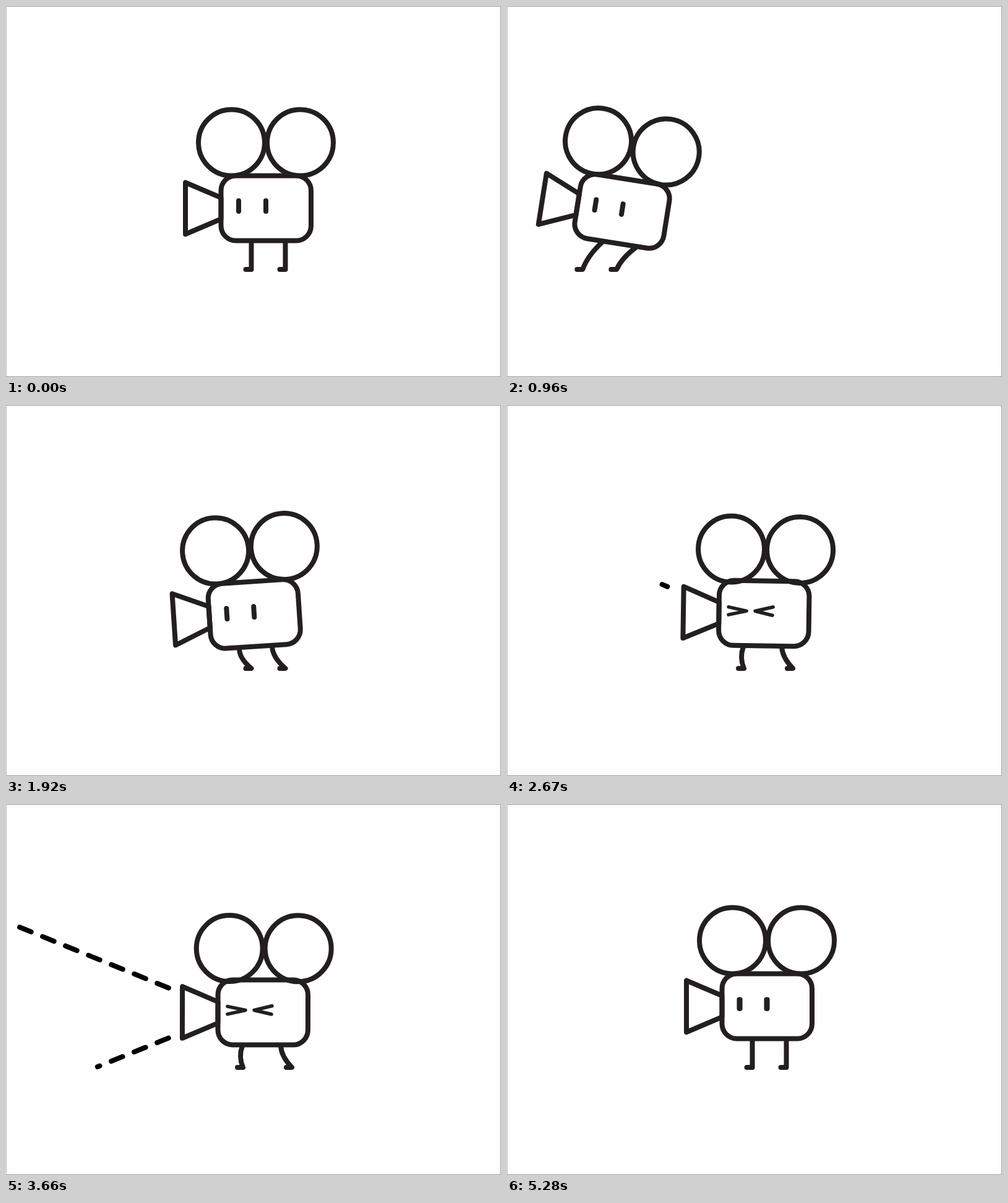
Animation, 800 px wide and 600 px high, one loop 5.31 s. Source, as an HTML page:

```html
<!DOCTYPE html>
<html lang="en">
<head>
<meta charset="utf-8">
<title>Movie camera</title>
<style>
  html, body { margin: 0; width: 100%; height: 100%; overflow: hidden; background: #fefefe; }
  svg { display: block; width: 800px; height: 600px; }
</style>
</head>
<body>
<svg viewBox="0 0 800 600" fill="none" stroke="#231f20" stroke-width="8" stroke-linecap="round" stroke-linejoin="round">
  <rect width="800" height="600" fill="#fefefe" stroke="none"/>
  <g id="root">
    <path id="legL"/>
    <path id="legR"/>
    <g id="body">
      <g stroke="#000">
        <path id="beamTop" stroke-dasharray="20 20"/>
        <path id="beamBottom" stroke-dasharray="20 20"/>
      </g>
      <g id="reels">
        <circle cx="364.5" cy="221" r="53.5"/>
        <circle cx="475.5" cy="221" r="53.5"/>
      </g>
      <path d="M290 285.5V369L347.5 344.5V310Z"/>
      <rect x="347.5" y="274.5" width="145.5" height="105" rx="24"/>
      <g id="eyes" stroke="none" fill="#231f20">
        <rect id="eyeL" x="-4" y="-12.5" width="8" height="25" rx="4"/>
        <rect id="eyeR" x="-4" y="-12.5" width="8" height="25" rx="4"/>
      </g>
      <path id="squint" stroke-width="5.5" d="M363 317.5L392 323.5L363 330M435 316.5L406 323.5L434 330"/>
    </g>
  </g>
  <rect x=".5" y=".5" width="799" height="599" stroke="#999" stroke-width="1"/>
</svg>
<script>
const LOOP = 5310, STEP = 30;
const el = id => document.getElementById(id);
const set = (id, name, value) => el(id).setAttribute(name, value);
const clamp = p => Math.min(1, Math.max(0, p));
const span = (t, from, to) => clamp((t - from) / (to - from));
const ease = p => p * p * (3 - 2 * p);
const arc = p => Math.sin(Math.PI * p);

// body x, y, angle; foot shift L, R; leg bend L, R; hip shift L, R; reel x, y
const STAND   = [0, 0, 0, 0, 0, 0, 0, 0, 0, 0, 0];
const CROUCH  = [-6, 16, -2, 0, 0, -18, -22, 0, 0, 0, 0];
const UP      = [0, -4, 0, 0, 0, 0, 0, 0, 0, 0, 0];
const SLIDE   = [0, 10, 0, 0, 0, -15, -24, 0, 1, 0, 0];
const LAG     = [40, 5, 9, 0, 0, -8, -8, 0, 0, 0, 0];
const BRAKE   = [-19, 11, -3.8, 0, 0, -10, -10, -4, -6, 0, 0];
const REBOUND = [3, -1, 0.8, 0, 0, 0, 0, 0, 0, 0, 0];
const BRACE   = [-5, 10, 0, -13.5, 10.5, -7, -8, -9.5, -2.5, 1.5, 2.7];

const POSES = [
  [0, STAND], [110, CROUCH], [180, UP], [280, SLIDE], [410, STAND], [470, CROUCH],
  [570, UP], [615, STAND], [720, STAND], [850, LAG], [1200, LAG], [1260, SLIDE],
  [1780, SLIDE], [1920, BRAKE], [2130, REBOUND], [2370, STAND], [2410, STAND],
  [2580, BRACE], [4110, BRACE], [4290, REBOUND], [4440, STAND], [LOOP, STAND]
];

function poseAt(t) {
  const i = POSES.findIndex(([time]) => time > t);
  const [t0, a] = POSES[i - 1], [t1, b] = POSES[i];
  const p = ease(span(t, t0, t1));
  return a.map((v, k) => v + (b[k] - v) * p);
}

function rootAt(t) {
  const flip = span(t, 150, 430), hop = arc(span(t, 1560, 1790));
  let x = 28 * arc(flip);
  if (t >= 720) x = -630 * span(t, 720, 1200) ** 1.2;
  if (t > 1230) x = 540 * (1 - span(t, 1320, 1790)) ** 1.3;
  return { x, y: -172 * arc(flip) - 66 * hop, angle: 360 * ease(flip) - 20 * hop };
}

const place = (x, y, angle) => `translate(${x} ${y}) rotate(${angle} 420 327)`;

function drawLeg(id, x, pose, shift, bend, hipShift) {
  const a = pose[2] * Math.PI / 180, hx = x - 420 + hipShift, hy = 54;
  const hipX = 420 + pose[0] + hx * Math.cos(a) - hy * Math.sin(a);
  const hipY = 327 + pose[1] + hx * Math.sin(a) + hy * Math.cos(a);
  const ankle = x + shift;
  set(id, 'd', `M${hipX} ${hipY}Q${(hipX + ankle) / 2 + bend} ${(hipY + 426) / 2} ${ankle} 426H${ankle - 9}`);
}

function drawBeam(id, x0, y0, x1, y1, t) {
  const start = ease(span(t, 3840, 4140)), end = ease(span(t, 2610, 2960));
  const at = p => `${x0 + (x1 - x0) * p} ${y0 + (y1 - y0) * p}`;
  const firstDash = 6 + (t - 3270) * 0.1572;
  set(id, 'd', `M${at(start)}L${at(end)}`);
  set(id, 'stroke-dashoffset', 20 - firstDash);
  set(id, 'visibility', end > 0 && start < 1 ? 'visible' : 'hidden');
}

function drawEyes(t) {
  const blink = [600, 4860, 5130].reduce((sum, from) => sum + arc(span(t, from, from + 180)) ** 3, 0);
  const scale = `scale(${1 + 1.1 * blink} ${1 - 0.72 * blink})`;
  set('eyeL', 'transform', `translate(376 323.5) ${scale}`);
  set('eyeR', 'transform', `translate(420 323.5) ${scale}`);
  const squinting = t >= 2550 && t < 4140;
  set('eyes', 'visibility', squinting ? 'hidden' : 'visible');
  set('squint', 'visibility', squinting ? 'visible' : 'hidden');
}

function draw(t) {
  const pose = poseAt(t), root = rootAt(t);
  const [x, y, angle, footL, footR, bendL, bendR, hipL, hipR, reelX, reelY] = pose;
  const shake = 0.8 * span(t, 2580, 2640) * (1 - span(t, 4080, 4140))
    * (1 - Math.cos(2 * Math.PI * (t - 3270) / 126.6));
  set('root', 'transform', place(root.x, root.y, root.angle));
  set('body', 'transform', place(x, y, angle + shake));
  set('reels', 'transform', `translate(${reelX} ${reelY})`);
  drawLeg('legL', 396.5, pose, footL, bendL, hipL);
  drawLeg('legR', 451.5, pose, footR, bendR, hipR);
  drawEyes(t);
  drawBeam('beamTop', 274.5, 290.5, 24.5, 189, t);
  drawBeam('beamBottom', 274.5, 366, 153, 415.5, t);
}

const begin = performance.now();
function tick() {
  const t = (performance.now() - begin) % LOOP;
  draw(Math.floor(t / STEP) * STEP);
  requestAnimationFrame(tick);
}
tick();
</script>
</body>
</html>
```
